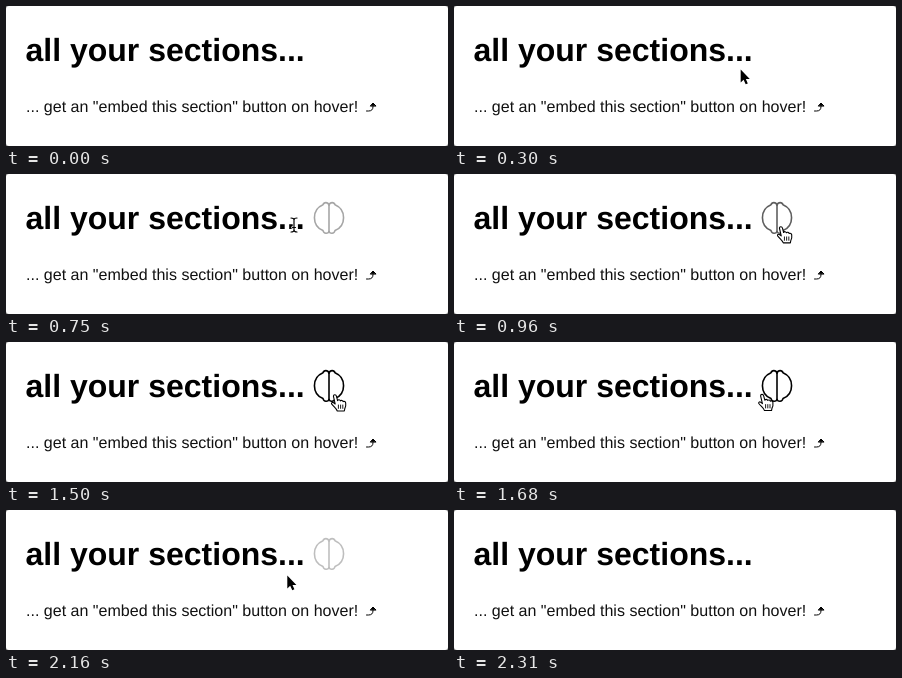
An HTML page for the animation above (2520 ms loop, 442x140 px).

```html
<!DOCTYPE html>
<html lang="en">
<head>
<meta charset="utf-8">
<title>Section button</title>
<style>
  html, body { margin: 0; width: 100%; height: 100%; overflow: hidden; background: #777; }
  svg {
    display: block; text-rendering: geometricPrecision;
    font-family: "Liberation Sans", Arial, Helvetica, sans-serif;
  }
  .line { fill: none; stroke: #000; stroke-linecap: round; stroke-linejoin: round; }
</style>
</head>
<body>
<svg width="442" height="140" viewBox="0 0 442 140">
  <defs>
    <path id="half" d="M323 31 C321.8 27.8 317.8 28 317 30.8 A14 14 0 0 0 317 56.6 C317.8 60 322 60 323 57.5"/>
    <path id="bar" d="M-3 -7 Q0 -7 0 -5 Q0 -7 3 -7 M0 -5 V5 M-3 7 Q0 7 0 5 Q0 7 3 7 M-1.5 2.5 H1.5"/>
  </defs>

  <rect width="442" height="140" rx="3" fill="#fff"/>
  <text x="19.5" y="55" font-size="32" font-weight="700">all your sections...</text>
  <text x="20" y="106" font-size="16.05" fill="#111">... get an "embed this section" button on hover!</text>
  <g class="line" stroke-width="1">
    <path d="M360.5 105 H362.5 Q367 105 367 100.5 V98"/>
    <path d="M364.5 99.8 L367 97 L369.8 99.8 Z" fill="#000"/>
  </g>

  <g id="icon" class="line" stroke-width="1.6">
    <use href="#half"/>
    <use href="#half" transform="matrix(-1 0 0 1 646 0)"/>
    <path d="M323 31 V57.5"/>
  </g>

  <!-- Each cursor has its hotspot at 0,0 -->
  <g id="arrow">
    <path d="M.8 .3 V13.3 L3.7 10.5 L5.8 15 L7.9 14.1 L6 9.7 H9.9 Z" stroke="#fff" paint-order="stroke"/>
  </g>
  <g id="beam" class="line">
    <use href="#bar" stroke="#fff" stroke-width="2.6"/>
    <use href="#bar" stroke-width="1.2"/>
  </g>
  <g id="hand" class="line">
    <path fill="#fff" stroke-width="1.1" d="M-1.6 1.2 C-1.6 -.6 1 -.7 1.4 1 L2.6 5.6 C3.2 4.4 5 4.5 5.4 5.9 C6.2 5 7.8 5.3 8.1 6.6 C9.2 6 10.6 6.6 10.7 8 C11 10.4 10.8 12 9.8 13.6 L9.3 16 H2.3 C1.6 13.8 -.6 12.3 -3.2 9.2 C-4.2 7.8 -2.6 6.8 -1.3 7.8 L.2 9 Z"/>
    <path stroke-width=".9" d="M3.4 10 V13.4 M5.6 10 V13.4 M7.8 10 V13.4"/>
  </g>
</svg>
<script>
const LOOP = 2520, STEP = 30;

const el = id => document.getElementById(id);
const icon = el("icon");
const cursors = ["arrow", "beam", "hand"].map(el);

const ramp = (t, from, to) => Math.min(1, Math.max(0, (t - from) / (to - from)));
const easeIn = k => k * k;
const easeOut = k => 1 - (1 - k) ** 3;
const smooth = k => k * k * (3 - 2 * k);

// Four moves: up to the title, right to the icon, back, and down off the stage.
function hotspot(t) {
  const enter = ramp(t, 60, 570);
  const reach = easeOut(ramp(t, 750, 1080));
  const back = smooth(ramp(t, 1500, 1890));
  const leave = ramp(t, 2070, 2310);
  return {
    x: 284 + 4 * enter + 41 * reach - 47 * back - 4 * leave,
    y: 134 - 83 * easeOut(enter) + 2 * reach - back + 94 * easeIn(leave)
  };
}

// Title hover shows the icon faintly, icon hover shows it in full.
function iconOpacity(t) {
  const title = ramp(t, 330, 570) - ramp(t, 2100, 2310);
  const self = ramp(t, 870, 1080) - ramp(t, 1680, 1890);
  return 0.35 * title + 0.65 * self;
}

function cursorAt({ x, y }) {
  if (x >= 308 && y < 62) return "hand";
  const overTitle = x < 299 && y < 61;
  const overNote = y > 92 && y < 110;
  return overTitle || overNote ? "beam" : "arrow";
}

function draw(t) {
  icon.setAttribute("opacity", iconOpacity(t));
  const spot = hotspot(t);
  const shown = t >= 60 && t < 2310 ? cursorAt(spot) : "";
  for (const c of cursors) {
    c.setAttribute("visibility", c.id === shown ? "visible" : "hidden");
    c.setAttribute("transform", `translate(${spot.x} ${spot.y})`);
  }
}

const start = performance.now();
function tick() {
  const t = (performance.now() - start) % LOOP;
  draw(Math.floor(t / STEP) * STEP);
  requestAnimationFrame(tick);
}
tick();
</script>
</body>
</html>
```
